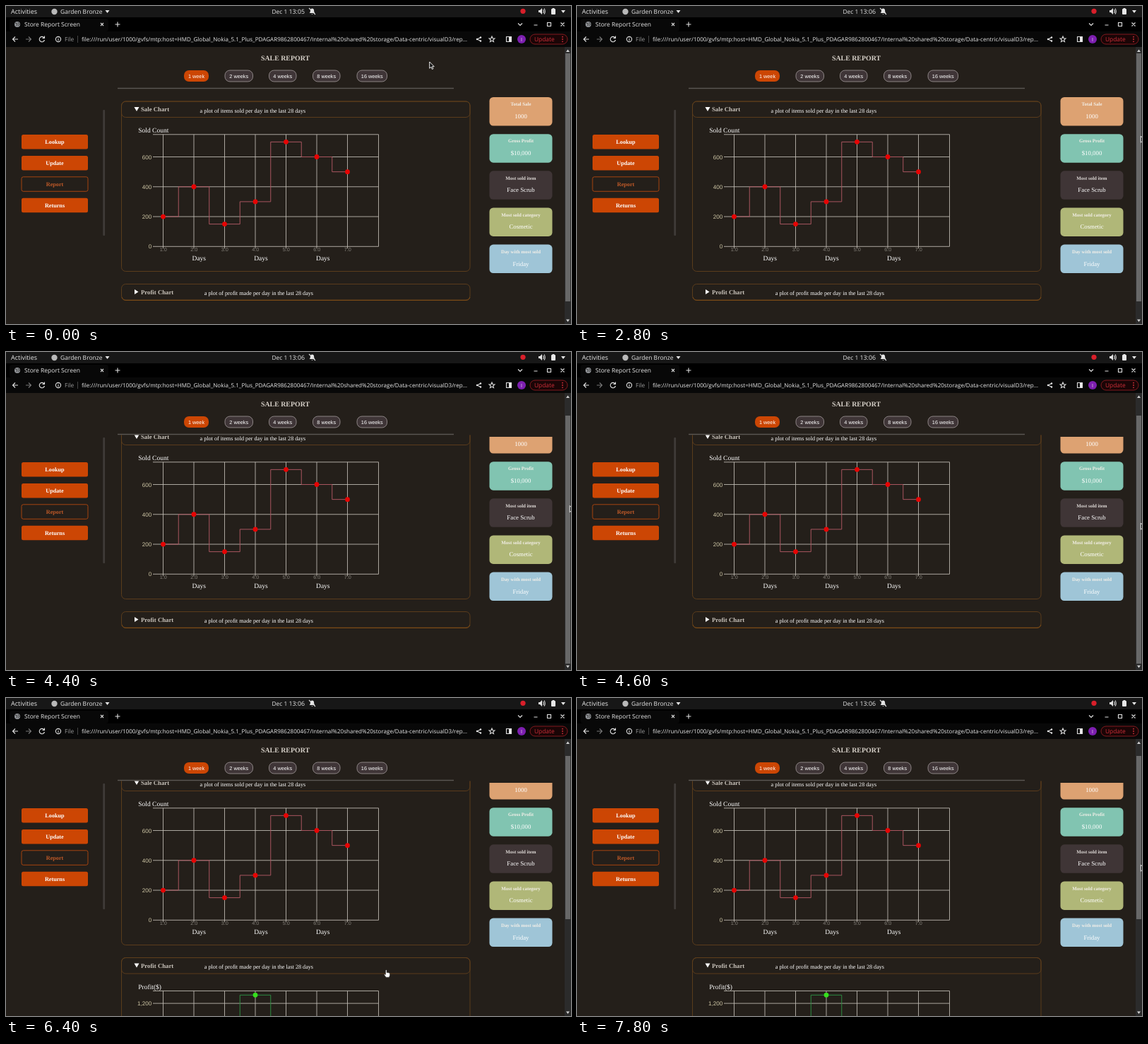
An HTML page for the animation above (8000 ms loop, 800 by 450 pixels).

```html
<!DOCTYPE html>
<html lang="en">
<head>
<meta charset="utf-8">
<title>Store Report Screen</title>
<style>
  html, body { margin: 0; width: 100%; height: 100%; overflow: hidden; background: #241f1a; }
  svg { display: block; width: 800px; height: 450px; }
  text { font-family: "Liberation Serif", serif; fill: #fff; text-rendering: geometricPrecision; white-space: pre; }
  .ui { font-family: "Open Sans", sans-serif; fill: #e8e8e8; }
  .sans { font-family: "Liberation Sans", sans-serif; }
  .b { font-weight: bold; }
  .mid { text-anchor: middle; }
  .end { text-anchor: end; }
  .line { fill: none; stroke: #e0e0e0; stroke-width: 1.1; }
  .frame { fill: none; stroke: #61401c; stroke-width: .9; }
</style>
</head>
<body>
<svg id="stage" viewBox="0 0 800 450"></svg>
<script>
const LOOP = 8000, STEP = 200, SCROLL = 26;
const CLICK = 5800, MINUTE = 2200;

const text = (x, y, size, str, cls = '', fill = '') =>
  `<text x="${x}" y="${y}" font-size="${size}" class="${cls}"${fill && ` style="fill:${fill}"`}>${str}</text>`;
const rect = (x, y, w, h, fill, rx = 0, extra = '') =>
  `<rect x="${x}" y="${y}" width="${w}" height="${h}" rx="${rx}" fill="${fill}" ${extra}/>`;
const path = (d, extra = 'class="line"') => `<path d="${d}" ${extra}/>`;
const circle = (x, y, r, extra) => `<circle cx="${x}" cy="${y}" r="${r}" ${extra}/>`;
const white = 'fill="#e8e8e8"';

function desktopBar() {
  return rect(0, 0, 800, 16, '#171717') +
    text(7, 11, 9, 'Activities', 'ui') +
    circle(68.5, 8, 4.2, 'fill="#b9b9b9"') +
    text(77, 11, 8.5, 'Garden Bronze', 'ui') +
    path('M140.500 6h6l-3 4z', white) +
    text(376.5, 11, 8.4, 'Dec 1', 'ui') +
    '<text id="clock" x="400.5" y="11" font-size="8.8" class="ui"></text>' +
    path('M429.500 10q1.500-1 1.500-4 0-2.500 2.500-2.500t2.500 2.500q0 3 1.500 4zM432.500 11h2l-1 1z', white) +
    path('M429 3l9 9') +
    circle(732, 7.300, 3.6, 'fill="#d81f2a"') +
    path('M754 6h2l3-3v9l-3-3h-2z', white) + path('M760.500 5q1.500 2.500 0 5M762 3.500q2.500 4 0 8') +
    rect(772, 4, 6, 8, '#e8e8e8', 1) + rect(773.5, 3, 3, 2, '#e8e8e8') +
    path('M786 6h6l-3 4z', white);
}

function browserBar() {
  return rect(0, 16, 800, 42, '#000') + rect(5, 18, 140, 18, '#080808', 4) + rect(0, 36, 800, 22, '#080808') +
    circle(16, 26, 4, 'fill="#8f9296"') + path('M13 24l3 1-1 3M17 23l2 3-2 2', 'fill="none" stroke="#333" stroke-width=".9"') +
    text(26, 29, 8.5, 'Store Report Screen', 'ui') +
    path('M134 24l4 4m0-4l-4 4M154.500 26h7M158 22.500v7') +
    path('M725 24.500l3 3 3-3M747.500 27h5M766.500 23.500h5v5h-5zM785.500 23.500l5 5m0-5l-5 5') +
    path('M17 47H9.500m3.500-3.500l-3.500 3.500 3.500 3.500') +
    path('M28 47h7.500m-3.500-3.500l3.500 3.500-3.500 3.500', 'fill="none" stroke="#777" stroke-width="1.1"') +
    path('M54 45a3.700 3.700 0 1 0 .5 3M54.500 42.500v3h-3') +
    circle(74, 47, 3.6, 'class="line"') + path('M74 46.500v2.500M74 44.800v.8') +
    text(83, 50, 8.4, 'File', 'ui', '#9a9a9a') + path('M101.500 42v10', 'stroke="#555" stroke-width=".8"') +
    text(107, 50, 8.06, 'file:///run/user/1000/gvfs/mtp:host=HMD_Global_Nokia_5.1_Plus_PDAGAR9862800467/Internal%20shared%20storage/Data-centric/visualD3/rep…', 'ui') +
    path('M672 44.500l-5 2.500 5 2.500') + [[672, 44.5], [667, 47], [672, 49.5]].map(p => circle(...p, 1.2, white)).join('') +
    path('M688 43l1.100 2.700 2.900.2-2.200 1.900.7 2.800-2.500-1.500-2.500 1.500.7-2.800-2.200-1.900 2.900-.2z') +
    path('M708.500 43.500h7v7h-7z') + rect(712, 43.5, 3.5, 7, '#e8e8e8') +
    circle(730, 47, 6, 'fill="#7d1fb0"') + text(730, 49.5, 7, 'I', 'ui mid') +
    rect(742, 40, 53, 14, '#1a0506', 7, 'stroke="#8f1c22" stroke-width=".9"') +
    text(748, 50, 8.4, 'Update', 'ui', '#d3303a') +
    [43.7, 47, 50.3].map(y => circle(788, y, .9, 'fill="#d3303a"')).join('');
}

function reportHeader() {
  const pills = [[252, 35, '1 week'], [310, 39.5, '2 weeks'], [372.5, 38.5, '4 weeks'], [434.5, 38.5, '8 weeks'], [497, 42.5, '16 weeks']];
  return text(395.5, 76.5, 9.9, 'SALE REPORT', 'b mid', '#d5cfc7') +
    pills.map(([x, w, label], i) =>
      rect(x, 91, w, 16, i ? '#3f3537' : '#cc4604', 7, i ? 'stroke="#a29b9b" stroke-width=".8"' : '') +
      text(x + w / 2, 101.6, 7.3, label, 'sans mid')).join('') +
    rect(158, 115.8, 476, 1.4, '#5b5753');
}

function sideMenu() {
  return ['Lookup', 'Update', 'Report', 'Returns'].map((label, i) => {
    const y = 182 + i * 29.9, current = label === 'Report';
    return rect(22, y, 94, 20.5, current ? 'none' : '#cc4604', 2.5, current ? 'stroke="#b5480f" stroke-width=".9"' : '') +
      text(69, y + 12.8, 8.2, label, 'b mid', current ? '#c05a28' : '#fff');
  }).join('') + rect(137.3, 147, 2.8, 178, '#3f3b38', 1);
}

function cards() {
  return [['Total Sale', '1000', '#dda272'], ['Gross Profit', '$10,000', '#81c4b1'], ['Most sold item', 'Face Scrub', '#3f3536'],
    ['Most sold category', 'Cosmetic', '#b0b778'], ['Day with most sold', 'Friday', '#9fc5d7']].map(([title, value, fill], i) => {
    const y = 129 + i * 52.15;
    return rect(684.5, y, 89, 40.5, fill, 5.5) +
      text(729, y + 12.2, 6.9, title, 'b mid', i === 2 ? '#ddd8d5' : '#f3efe8') +
      text(729, y + 30, 8.8, value, 'mid');
  }).join('');
}

function summary(y, title, note, noteX) {
  return rect(163.5, y, 493.5, 22.5, 'none', 6, 'class="frame"') +
    text(191, y + 14, 8.75, title, 'b', '#c8c2ba') + text(noteX, y + 15.7, 8.17, note);
}

const openMark = y => path(`M181.500 ${y + 8}h7l-3.500 6z`, 'fill="#fff"');
const closedMark = y => path(`M182 ${y + 7.5}v7l5.500-3.500z`, 'fill="#fff"');

function chart(top, title, max, tick, data, stroke, dot) {
  const height = 158.5, bottom = top + height;
  const px = i => 222.5 + i * 43.5, py = v => bottom - v * height / max;
  let grid = `M208 ${top}H527.500V${bottom}`, labels = '', dots = '', step = '';
  for (let v = 0; v < max; v += tick) {
    grid += `M208 ${py(v)}H527.500`;
    labels += text(206.3, py(v) + 3, 8.1, v.toLocaleString('en-US'), 'sans end', '#cfc7a6');
  }
  data.forEach((v, i) => {
    grid += `M${px(i)} ${top}V${bottom + 3}`;
    labels += text(px(i) + .3, bottom + 7, 7.3, (i + 1).toFixed(1), 'sans mid', '#85817a');
    step += i ? `H${px(i - .5)}V${py(v)}H${px(i)}` : `M${px(i)} ${py(v)}`;
    dots += circle(px(i), py(v), 3.4, `fill="${dot}"`);
  });
  const days = [273.3, 361, 448.8].map(x => text(x, bottom + 20, 9.5, 'Days', 'mid')).join('');
  return text(187.3, top - 3, 9.5, title) + path(grid, 'fill="none" stroke="#c3beb6" stroke-width=".85"') +
    path(step, `fill="none" stroke="${stroke}" stroke-width="1"`) + dots + labels + days;
}

function panels() {
  return rect(163.5, 135, 493.5, 240.5, 'none', 6, 'class="frame"') +
    summary(135, 'Sale Chart', 'a plot of items sold per day in the last 28 days', 274.5) + openMark(135) +
    chart(181.8, 'Sold Count', 750, 200, [200, 400, 150, 300, 700, 600, 500], '#a8555f', '#e60303') +
    summary(393.5, 'Profit Chart', 'a plot of profit made per day in the last 28 days', 280.8) +
    `<g id="closed">${closedMark(393.5)}${path('M164 412q1 4.500 6 4.500H651q5 0 6-4.500', 'fill="none" stroke="#7a4a16" stroke-width="1"')}</g>` +
    `<g id="open">${openMark(393.5)}${rect(163.5, 393.5, 493.5, 240.5, 'none', 6, 'class="frame"')}` +
    chart(440.5, 'Profit($)', 1350, 200, [400, 800, 300, 1300, 1000, 700, 600], '#2c8a41', '#35e01c') + '</g>';
}

function scrollbar() {
  return rect(791, 58, 9, 392, '#2b2b2b') +
    path('M793 65l2.500-3.500 2.500 3.500zM793 443.500l2.500 3.500 2.500-3.500z', 'fill="#d0d0d0"') +
    '<rect id="thumb" x="792" width="7" fill="#686868"/>';
}

const $ = id => document.getElementById(id);
$('stage').innerHTML =
  `<clipPath id="belowRule"><path d="M0 117.500H660V120H791V450H0z"/></clipPath>
  ${rect(0, 0, 800, 450, '#241f1a')}
  <g clip-path="url(#belowRule)"><g id="page">${sideMenu()}${panels()}${cards()}</g></g>
  ${reportHeader()}${scrollbar()}${browserBar()}${desktopBar()}
  <g id="cursor" stroke-linejoin="round">
    <path id="arrow" d="M0 0V9.200L2.200 7.300 3.700 10.500 5.200 9.800 3.700 6.700H6.500z" fill="#111" stroke="#fff" stroke-width=".9"/>
    <path id="hand" d="M0 .7q.9-1 1.600 0V4q3 0 4.400 1v3l-1 2.700H.5L-2 7q0-1.500 2 0z" fill="#fff" stroke="#222" stroke-width=".5"/>
  </g>`;

// Pointer stops: time, x, y
const stops = [[0, 599.7, 79], [200, 599.7, 79], [1400, 595, 235], [1800, 595, 235], [2600, 798.3, 184], [3200, 798.3, 184],
  [4200, 798.3, 193], [4600, 798.3, 242], [4800, 798.3, 242], [5600, 537.5, 384.5], [6600, 537.5, 384.5], [7600, 798.3, 236], [LOOP, 798.3, 236]];

function pointerAt(t) {
  const i = stops.findIndex(s => s[0] > t);
  const [t0, x0, y0] = stops[i - 1], [t1, x1, y1] = stops[i];
  const k = (t - t0) / (t1 - t0), e = k * k * (3 - 2 * k);
  return [x0 + (x1 - x0) * e, y0 + (y1 - y0) * e];
}

function draw(now) {
  const t = Math.floor(now % LOOP / STEP) * STEP;
  const [x, y] = pointerAt(t);
  // The page follows the dragged scrollbar thumb until it hits the end.
  const drag = t < 4200 ? 0 : t < 4600 ? Math.min(1, (y - 193) / 24) : 1;
  const opened = t >= CLICK;
  const overSummary = x < 657 && y > 367 && y < 390;

  $('clock').textContent = t < MINUTE ? '13:05' : '13:06';
  $('page').setAttribute('transform', `translate(0 ${-SCROLL * drag})`);
  $('thumb').setAttribute('y', opened ? 82 : 67 + 23 * drag);
  $('thumb').setAttribute('height', opened ? 231 : 351);
  $('open').style.display = opened ? '' : 'none';
  $('closed').style.display = opened ? 'none' : '';
  $('arrow').style.display = overSummary ? 'none' : '';
  $('hand').style.display = overSummary ? '' : 'none';
  $('cursor').setAttribute('transform', `translate(${x} ${y})`);
  requestAnimationFrame(draw);
}
requestAnimationFrame(draw);
</script>
</body>
</html>
```
